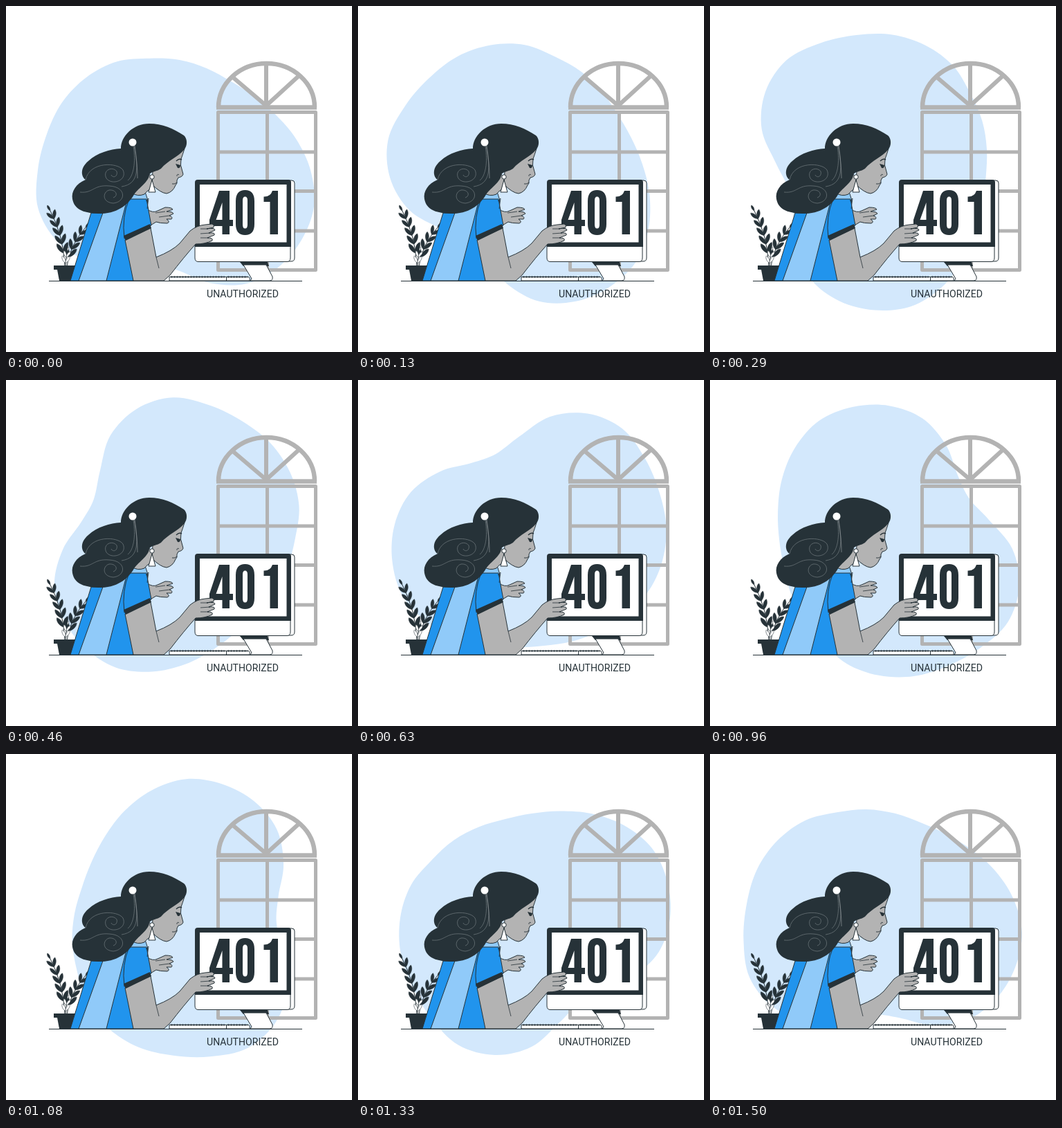
Animation, 500 px wide and 500 px high, one loop 1540 ms. Source, as an HTML page with a canvas:

```html
<!DOCTYPE html>
<html lang="en">
<head>
<meta charset="utf-8">
<title>401 Unauthorized</title>
<style>
  html, body { margin: 0; width: 100%; height: 100%; overflow: hidden; background: #fff; }
  canvas { display: block; width: 100vw; height: 100vh; }
</style>
</head>
<body>
<canvas id="stage" aria-label="401 Unauthorized"></canvas>
<script>
const canvas = document.getElementById('stage');
const ctx = canvas.getContext('2d');
const dpr = window.devicePixelRatio || 1;
canvas.width = canvas.height = 500 * dpr;

const INK = '#263238', BLUE = '#2194ed', LIGHT = '#90caf9', PALE = '#d3e8fc';
const GRAY = '#b3b3b3', WHITE = '#fff';
const LOOP = 1540, STEPS = 37, STEP = 1000 / 24;

function shape(d, fill, stroke, width = 1) {
  const path = new Path2D(d);
  if (fill) { ctx.fillStyle = fill; ctx.fill(path, 'evenodd'); }
  if (stroke) { ctx.strokeStyle = stroke; ctx.lineWidth = width; ctx.stroke(path); }
}
const line = (d, width = 1, color = INK) => shape(d, null, color, width);

function dot(x, y, r, fill, stroke) {
  ctx.beginPath();
  ctx.arc(x, y, r, 0, Math.PI * 2);
  ctx.fillStyle = fill;
  ctx.fill();
  if (stroke) { ctx.strokeStyle = stroke; ctx.lineWidth = 1; ctx.stroke(); }
}

// Blob: radii at every 15 degrees, joined by a closed smooth curve.
const PIVOT = [251, 237];
const radii = [189, 201, 203, 200, 190, 169, 146, 140, 156, 186, 205, 212,
               205, 199, 196, 190, 181, 167, 159, 152, 148, 151, 160, 174];
const blob = smoothLoop(radii.map((r, i) => {
  const a = i * Math.PI * 2 / radii.length;
  return [r * Math.cos(a), r * Math.sin(a)];
}));

function smoothLoop(points) {
  const n = points.length, at = i => points[(i + n) % n], path = new Path2D();
  path.moveTo(...points[0]);
  for (let i = 0; i < n; i++) {
    const [a, b, c, d] = [at(i - 1), at(i), at(i + 1), at(i + 2)];
    path.bezierCurveTo(b[0] + (c[0] - a[0]) / 6, b[1] + (c[1] - a[1]) / 6,
                       c[0] - (d[0] - b[0]) / 6, c[1] - (d[1] - b[1]) / 6, c[0], c[1]);
  }
  return path;
}

// One full turn per loop, slightly slower around the seam.
function drawBlob(progress) {
  const turn = progress * Math.PI * 2;
  ctx.save();
  ctx.translate(...PIVOT);
  ctx.rotate(turn - 0.085 * Math.sin(turn));
  ctx.fillStyle = PALE;
  ctx.fill(blob);
  ctx.restore();
}

function drawWindow() {
  line('M307 146.5A69.5 63.5 0 0 1 446 146.5M304 146.5H449', 6.5, GRAY);
  line('M376 145V84M376 144L329 104M376 144L422 102', 6, GRAY);
  line('M306.5 153.5H447.5V381.5H306.5ZM377.5 153V381M306 211H447M306 267.5H447M306 325H447', 5, GRAY);
}

function leaf(x, y, angle, length, fill) {
  const w = length * 0.24;
  ctx.save();
  ctx.translate(x, y);
  ctx.rotate(angle);
  shape(`M0 0C${length * 0.3} ${-w} ${length * 0.8} ${-w} ${length} 0C${length * 0.7} ${w} ${length * 0.3} ${w * 0.7} 0 0Z`,
        fill, INK, 0.5);
  ctx.restore();
}

function sprig([x0, y0], [x1, y1], [x2, y2], pairs, length, fill) {
  line(`M${x0} ${y0}Q${x1} ${y1} ${x2} ${y2}`);
  for (let i = 0; i <= pairs; i++) {
    const t = 0.22 + 0.78 * i / pairs, u = 1 - t;
    const x = u * u * x0 + 2 * u * t * x1 + t * t * x2;
    const y = u * u * y0 + 2 * u * t * y1 + t * t * y2;
    const heading = Math.atan2(u * (y1 - y0) + t * (y2 - y1), u * (x1 - x0) + t * (x2 - x1));
    const size = length * (1.1 - 0.3 * t);
    if (i === pairs) leaf(x, y, heading, size * 0.7, fill);
    else for (const side of [-0.5, 0.5]) leaf(x, y, heading + side, size, fill);
  }
}

function drawPlant() {
  sprig([85, 376], [83, 332], [64, 296], 5, 16, INK);
  sprig([88, 376], [92, 346], [115, 320], 4, 16, INK);
  sprig([86, 376], [86, 366], [89, 354], 2, 11, WHITE);
  shape('M69 375H101V381H98L95 397H77L74 381H69Z', INK);
}

function drawMonitor() {
  shape('M277 252H413Q417 252 417 256V364Q417 369 412 369H277Z', WHITE, INK);
  shape('M273 346H411V364Q411 369.5 406 369.5H278Q273 369.5 273 364Z', WHITE, INK);
  shape('M277 251H408Q412 251 412 255V348H273V255Q273 251 277 251Z', INK);
  shape('M280 258H405.5V341.5H280Z', WHITE);
  shape('M338 370H378L380 376H343Z', INK);
  shape('M343 374H376L385 391Q386 397 381 397H353L355 394Z', WHITE, INK);
  drawNumber();
  shape('M236 391.5H350Q353 392 352 397H236Z', WHITE, INK);
  line('M318.5 392V397');
  ctx.setLineDash([3, 1]);
  line('M238 391.5H316M320 391.5H349', 2);
  ctx.setLineDash([]);
}

function drawNumber() {
  shape('M308 267H323V309H328V318H323V330H312.5V318H294V309ZM312.5 284L303.5 309H312.5Z', INK);
  shape('M332 282Q332 266 345.5 266T359 282V315Q359 331 345.5 331T332 315Z' +
        'M342 281V316Q342 321.5 345.5 321.5T349 316V281Q349 275.5 345.5 275.5T342 281Z', INK);
  shape('M385 267H393V330H381.5V283H372.5V275.5Q382 276 385 267Z', INK);
}

function drawHead() {
  shape('M182 270L207 243L217 260Q205 265 200 272Q190 276 182 270Z', GRAY, INK);
  shape('M212 238L250 204L258 206Q255 216 253 221L252.5 230L256 243Q255 247 249 248L247 252L247 256L245 259Q241 269 232 271Q223 270 211 258Z', GRAY, INK);
  line('M246 224Q250 220 254 222', 1.4);
  shape('M245 228L252 230Q252 235 248 234Z', INK);
  line('M240 257Q244 258 247 255M250 244Q247 242 247 246', 0.9);
  shape('M257 208C263 202 262 191 257 187C242 177 226 170 207 170C184 170 166 188 166 206' +
        'C150 207 132 212 119 224C106 235 109 247 115 251C101 257 94 268 96 279' +
        'C99 295 114 300 138 300C164 299 178 285 186 271C191 264 207 253 207 244' +
        'C209 239 219 239 224 235C234 223 249 218 257 208Z', INK);
  const strand = d => line(d, 0.8, '#6a7478');
  strand('M115 251C121 224 162 226 169 237C176 252 153 260 145 249C139 237 154 231 160 239C162 247 154 249 152 244');
  strand('M107 269C126 271 126 258 149 260C174 261 174 283 155 285C139 284 139 269 149 266C159 265 163 274 155 277');
  strand('M185 202C191 234 193 257 167 261M184 203C188 226 184 246 176 252');
  line('M186 202Q190 229 190 249', 0.8, '#838b8e');
  dot(183, 197, 5.5, WHITE);
  dot(211, 247, 3.2, WHITE, INK);
  shape('M211 251L206 269H216Z', WHITE, INK);
}

function drawBody() {
  shape('M203 293Q212 300 219 296L230 291Q240 291 241 294L232 297Q241 297 242 300L236 303Q242 305 239 308L232 308Q238 312 233 314Q222 314 217 312L207 318Z', GRAY, INK);
  line('M216 299L230 297M221 305L236 303', 0.8);
  shape('M123 299H142L183 267L205 281L184 397H93Z', BLUE, INK);
  shape('M140 299L180 269L192 277L178 280L173 287L145 397H105Z', LIGHT, INK);
  shape('M183 268L198 262Q202 270 205 281H178Z', LIGHT, INK);
  shape('M172 338L209 321Q213 342 217 363Q240 354 251 343L266 325Q276 317 288 316L298 315Q302 317 300 320L290 322Q302 320 302 324L293 328Q303 327 301 331L291 335Q300 335 298 339Q288 344 274 344Q257 363 237 389L228 397H184Z', GRAY, INK);
  line('M217 363L221 379M281 322L292 322M281 329L295 328M281 335L293 335', 0.8);
  shape('M178 279H203L210 317L171 336Q167 304 178 279Z', BLUE, INK);
  shape('M170 332L208 315L210 321L173 339Z', INK);
  line('M202 282L206 278L204 293', 0.8);
}

// Narrowest installed sans, sized to the caption's space.
const CAPTION = 'UNAUTHORIZED', CAPTION_WIDTH = 104;
const captionFont = (() => {
  const font = (family, size) => `extra-condensed ${size}px "${family}", sans-serif`;
  const widthOf = family => {
    ctx.font = font(family, 22);
    return ctx.measureText(CAPTION).width;
  };
  const [best] = ['Noto Sans', 'Open Sans', 'Roboto', 'Lato'].sort((a, b) => widthOf(a) - widthOf(b));
  return font(best, Math.min(22.5, 22 * CAPTION_WIDTH / widthOf(best)));
})();

function drawCaption() {
  ctx.font = captionFont;
  ctx.textAlign = 'center';
  ctx.textBaseline = 'alphabetic';
  ctx.fillStyle = INK;
  const { actualBoundingBoxAscent: height } = ctx.measureText(CAPTION);
  ctx.fillText(CAPTION, 342, 415.5 + height / 2);
}

function render(now) {
  const step = Math.floor((now % LOOP + 5) / STEP) % STEPS;
  ctx.setTransform(dpr, 0, 0, dpr, 0, 0);
  ctx.lineJoin = 'round';
  ctx.fillStyle = WHITE;
  ctx.fillRect(0, 0, 500, 500);
  drawBlob(step / STEPS);
  drawWindow();
  drawPlant();
  drawMonitor();
  drawBody();
  drawHead();
  line('M62 397.5H428', 1.2);
  drawCaption();
}

const start = performance.now();
function tick() {
  render(performance.now() - start);
  requestAnimationFrame(tick);
}
tick();
</script>
</body>
</html>
```
